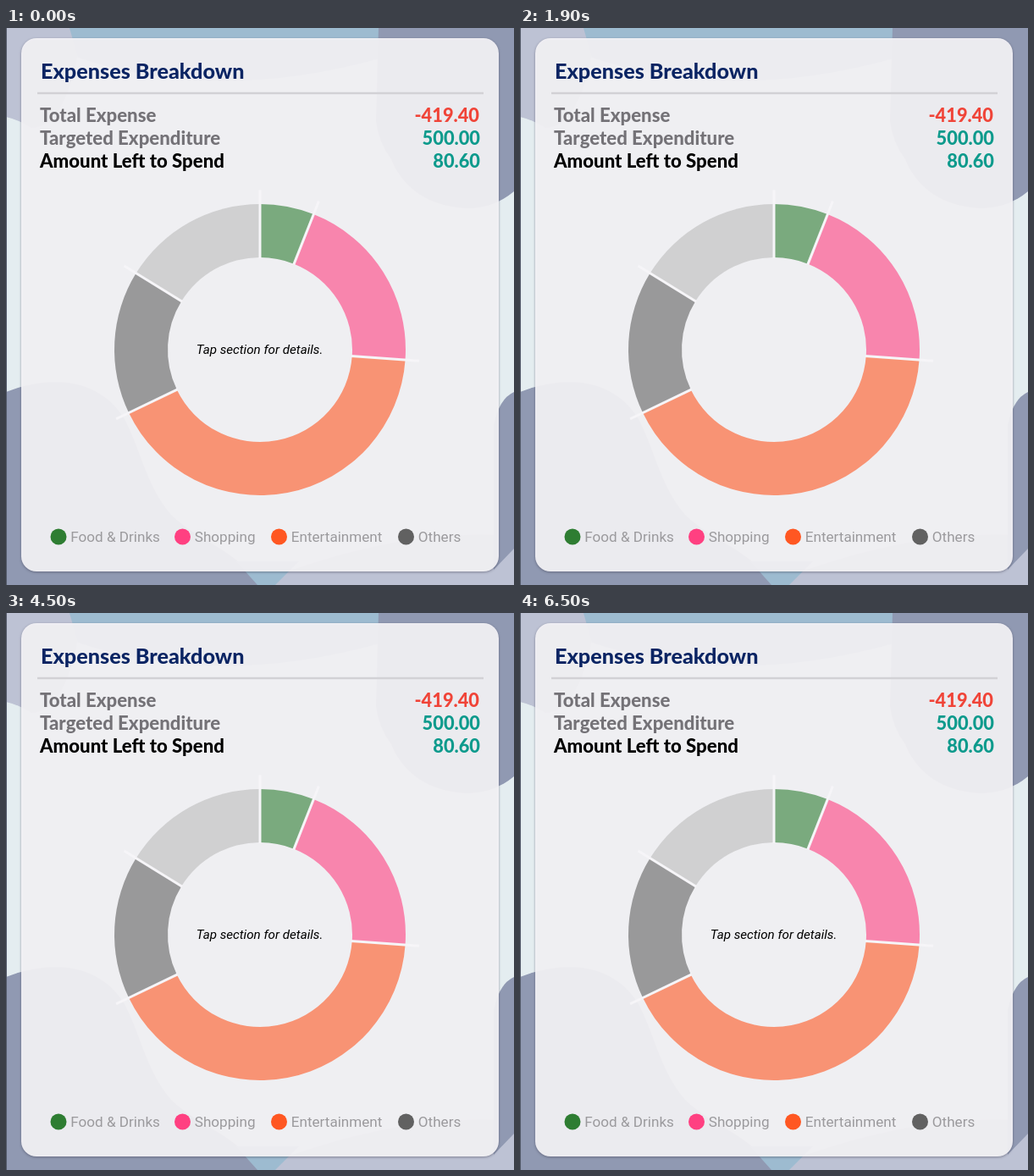
An HTML page for the animation above (6600 ms loop, 600 px wide and 658 px high).

```html
<!DOCTYPE html>
<html lang="en">
<head>
<meta charset="utf-8">
<title>Expenses Breakdown</title>
<style>
html, body { margin: 0; width: 100%; height: 100%; overflow: hidden; }
svg { display: block; width: 600px; height: 658px; }
text { font-family: Roboto, sans-serif; }
.lato, .lato text { font-family: Lato, sans-serif; font-weight: 800; }
.rows { font-size: 22.2px; }
.value { font-size: 21.8px; font-weight: 900; text-anchor: end; }
.center { text-anchor: middle; }
#card { filter: drop-shadow(0 1.5px 1.5px rgba(40, 40, 60, .45)); }
</style>
</head>
<body>
<svg viewBox="0 0 600 658">
  <rect width="600" height="658" fill="#e4edf0"/>
  <path d="M0 0H90Q74 118 30 118Q14 108 0 105Z" fill="#bdc2d4"/>
  <path d="M75 0H445V35Q250 90 85 35Z" fill="#9dbbd0"/>
  <path d="M440 0H600V193Q576 213 545 213C495 211 467 185 455 155Q440 135 437 110Z" fill="#9099b2"/>
  <path d="M300 658L333 642Q480 590 600 600V658Z" fill="#bdc2d4"/>
  <path d="M600 430Q582 438 576 470V640L600 615Z" fill="#9099b2"/>
  <path d="M0 430C50 410 110 412 140 462C160 500 165 540 195 575C225 605 270 615 300 658H0Z" fill="#9099b2"/>
  <path d="M272 630H346L318 658H297Z" fill="#9dbbd0"/>
  <rect width="1" height="658" fill="#555b6b"/>
  <rect id="card" x="18" y="12" width="564" height="630" rx="18" fill="#f6f5f8" fill-opacity=".93"/>

  <g class="lato">
    <text x="41" y="60" font-size="25.2" fill="#0a2463">Expenses Breakdown</text>
    <path d="M37 77H564" stroke="#d2d1d5" stroke-width="2.6"/>
    <g class="rows">
      <text x="40" y="111" fill="#747277">Total Expense</text>
      <text x="40" y="138" fill="#747277">Targeted Expenditure</text>
      <text x="40" y="165">Amount Left to Spend</text>
      <text class="value" x="559" y="111" fill="#f04438">-419.40</text>
      <text class="value" x="560" y="138" fill="#0d9a8c">500.00</text>
      <text class="value" x="560" y="165" fill="#0d9a8c">80.60</text>
    </g>
  </g>

  <g id="ring"></g>
  <text id="hint" class="center" x="299.5" y="385" font-size="15.2" font-style="italic">Tap section for details.</text>
  <g id="detail" class="center" font-size="23.2" fill="#1c1b1e">
    <text x="293.5" y="378">Shopping</text>
    <text x="296.5" y="406">100.60</text>
  </g>
  <g id="legend" font-size="17.1"></g>
</svg>
<script>
const LOOP = 6600, TAP = 500, RELEASE = 1700, PICK = 1;
const INNER = 109, OUTER = 172, GROWN = 187.5;
const edges = [0, 21.6, 94, 244.3, 301.7, 360];
const colors = ['#2e7d32', '#ff4081', '#ff5722', '#616161', '#bdbdbd'];
const items = [['Food & Drinks', 62], ['Shopping', 208.5], ['Entertainment', 322.5], ['Others', 472.5]];
const $ = id => document.getElementById(id);

function add(parent, tag, attrs) {
  const el = document.createElementNS('http://www.w3.org/2000/svg', tag);
  set(el, attrs);
  return parent.appendChild(el);
}
function set(el, attrs) {
  for (const key in attrs) el.setAttribute(key, attrs[key]);
}
function polar(deg, r) {
  const a = deg * Math.PI / 180;
  return `${300 + r * Math.sin(a)} ${380 - r * Math.cos(a)}`;
}
function wedge(from, to, r) {
  const large = +(to - from > 180);
  return `M${polar(from, r)}A${r} ${r} 0 ${large} 1 ${polar(to, r)}` +
    `L${polar(to, INNER)}A${INNER} ${INNER} 0 ${large} 0 ${polar(from, INNER)}Z`;
}

const slices = colors.map((fill, i) =>
  add($('ring'), 'path', { fill, 'fill-opacity': .6, d: wedge(edges[i], edges[i + 1], OUTER) }));
edges.slice(1).forEach(deg =>
  add($('ring'), 'path', { d: `M${polar(deg, INNER - 1)}L${polar(deg, GROWN + 1)}`, stroke: '#f6f5f8', 'stroke-width': 3 }));

const keys = items.map(([name, x], i) => {
  const dot = add($('legend'), 'circle', { cx: x, cy: 601, r: 9.5, fill: colors[i] });
  const label = add($('legend'), 'text', { x: x + 14.3, y: 607, fill: '#9b9a9d' });
  label.textContent = name;
  return { dot, label, x };
});

const ramp = (t, start, span) => Math.min(1, Math.max(0, (t - start) / span));
const ease = u => u * u * (3 - 2 * u);

function draw(t) {
  const on = ease(ramp(t, TAP, 150)) - ease(ramp(t, RELEASE, 150));
  set($('card'), { height: 630 + 5 * on });
  set(slices[PICK], {
    d: wedge(edges[PICK], edges[PICK + 1], OUTER + (GROWN - OUTER) * on),
    'fill-opacity': .6 + .4 * on
  });
  keys.forEach(({ dot, label, x }, i) => {
    const shift = 3 * on * Math.sign(i - PICK);
    set(dot, { cx: x + shift, r: 9.5 + (i === PICK ? 3 * on : 0) });
    set(label, { x: x + 14.3 + (i === PICK ? 3 * on : shift) });
  });
  set(keys[PICK].label, { fill: on > .5 ? '#111' : '#9b9a9d' });
  set($('hint'), { opacity: 1 - ramp(t, TAP, 80) + ramp(t, 1950, 100) });
  set($('detail'), { opacity: ramp(t, TAP + 100, 100) - ramp(t, RELEASE, 100) });
}

const began = performance.now();
function tick() {
  draw((performance.now() - began) % LOOP);
  requestAnimationFrame(tick);
}
tick();
</script>
</body>
</html>
```
